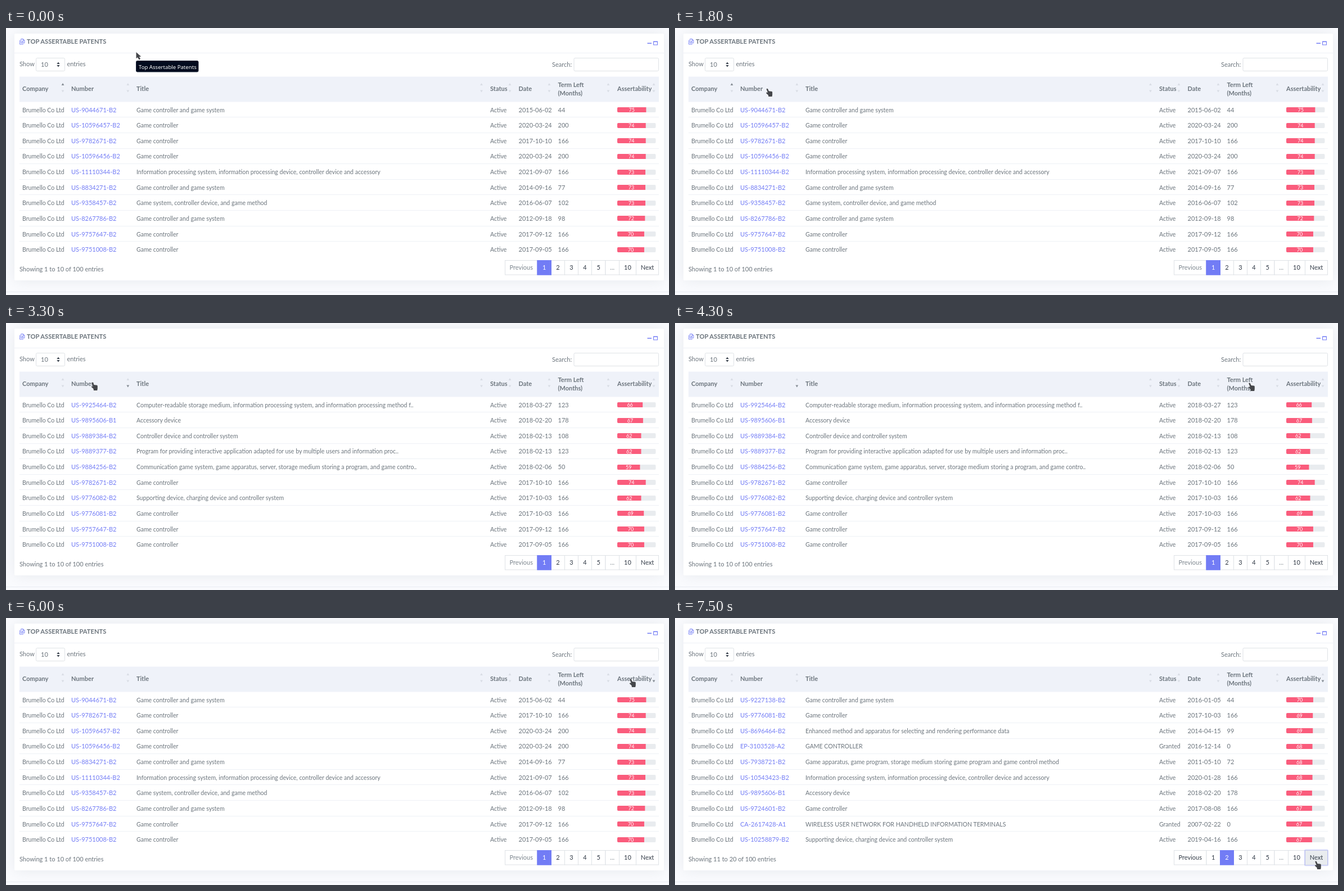
These frames come from a looping animation (1179 by 475 pixels, 8 s). An HTML page:

```html
<!DOCTYPE html>
<html lang="en">
<head>
<meta charset="utf-8">
<title>Top assertable patents</title>
<style>
html, body { margin: 0; width: 100%; height: 100%; overflow: hidden; background: #fafbfe; }
svg { display: block; width: 1179px; height: 475px; }
text { font: 11px Lato, "Open Sans", sans-serif; fill: #6c757d; white-space: pre; }
.head { font-weight: 700; }
.title { font-weight: 700; font-size: 11.15px; }
.cell { font-size: 10.55px; }
.link { fill: #727cf5; }
.val { font-size: 9px; fill: #fff; text-anchor: middle; }
.page { text-anchor: middle; fill: #313a46; }
.tip { font: 9.6px "Noto Sans", sans-serif; fill: #fff; }
</style>
</head>
<body>
<svg id="stage" viewBox="0 0 1179 475" xmlns="http://www.w3.org/2000/svg">
  <filter id="soft" x="-10%" y="-20%" width="120%" height="140%"><feGaussianBlur stdDeviation="13"/></filter>
  <rect width="1179" height="475" fill="#fafbfe"/>
  <rect x="15" y="10" width="1155" height="439" fill="#9aa1ab" opacity=".2" filter="url(#soft)"/>
  <rect x="15" y="10" width="1155" height="439" rx="2" fill="#fff"/>
  <path d="M15 44.5H1170" stroke="#eef1f7"/>
  <path d="M0 469.5H1179" stroke="#e9ecf2"/>
  <g fill="none" stroke="#727cf5">
    <path d="M26.7 19.5h3.8l2.4 2.4v4.8h-6.2zM30.3 19.6v2.6h2.5M24.6 21.6v7.4h6.4M28.2 23.5h2.8M28.2 25h2.8" stroke-width=".9"/>
    <path d="M1140.5 27.2h7.5" stroke-width="1.5"/>
    <path d="M1151.6 24h6.8v6h-6.8zM1151.6 24.4h6.8" stroke-width="1.1"/>
  </g>
  <g fill="#fff" stroke="#dee2e6">
    <rect x="53.5" y="53.5" width="51" height="23" rx="2"/>
    <rect x="1010" y="53.5" width="150.5" height="23" rx="2"/>
  </g>
  <path d="M90.3 64L93 60.8 95.7 64zM90.3 66L93 69.2 95.7 66z" fill="#313a46"/>
  <rect x="24" y="86.5" width="1137" height="45" fill="#eff2f9"/>
  <g id="chrome"></g>
  <g id="marks"></g>
  <g id="table"></g>
  <g id="pager"></g>
  <g id="tooltip">
    <rect x="231.5" y="58.5" width="110.5" height="19.5" rx="2" fill="#020b1e" stroke="#1b2437"/>
    <text class="tip" x="236" y="72.6">Top Assertable Patents</text>
  </g>
  <path id="cursor" fill="#44464a" stroke="#fff" stroke-opacity=".5" stroke-width=".8" paint-order="stroke"/>
</svg>
<script>
const LOOP = 8000, STEP = 100;
const OWNER = "Brumello Co Ltd";
const $ = id => document.getElementById(id);

// number | title | status | date | months left | score
const records = `
US-9044671-B2|Game controller and game system|Active|2015-06-02|44|75
US-10596457-B2|Game controller|Active|2020-03-24|200|74
US-9782671-B2|Game controller|Active|2017-10-10|166|74
US-10596456-B2|Game controller|Active|2020-03-24|200|74
US-11110344-B2|Information processing system, information processing device, controller device and accessory|Active|2021-09-07|166|73
US-8834271-B2|Game controller and game system|Active|2014-09-16|77|73
US-9358457-B2|Game system, controller device, and game method|Active|2016-06-07|102|73
US-8267786-B2|Game controller and game system|Active|2012-09-18|98|72
US-9757647-B2|Game controller|Active|2017-09-12|166|70
US-9751008-B2|Game controller|Active|2017-09-05|166|70
CA-2507075-A1|GAME CONSOLE AND MEMORY CARD|Granted|2006-02-20|0|58
CA-2617428-A1|WIRELESS USER NETWORK FOR HANDHELD INFORMATION TERMINALS|Granted|2007-02-22|0|67
CA-2746481-A1|GAME SYSTEM, CONTROLLER DEVICE, AND GAME PROCESS METHOD|Granted|2011-08-03|0|63
CA-2746486-A1|DISPLAY DEVICE, GAME SYSTEM, AND GAME PROCESS METHOD|Granted|2011-08-03|0|63
EP-1747806-A1|GAME APPARATUS, GAME PROGRAM, MEMORY MEDIUM WHERE GAME PROGRAM IS STORED, AND GAME CONTROL METHOD|Granted|2007-01-31|0|59
EP-1757345-A1|Video game controller and video game system|Granted|2007-02-28|0|61
EP-1935124-A2|WIRELESS USER NETWORK FOR HANDHELD INFORMATION TERMINALS|Granted|2008-06-25|0|63
EP-2292305-A1|Video game controller and video game system|Granted|2011-03-09|0|60
EP-2392391-A1|DISPLAY DEVICE, GAME SYSTEM, AND GAME PROCESSING METHOD|Granted|2011-12-07|0|58
EP-2395763-A2|Storage medium having stored therein stereoscopic image display program, stereoscopic image display ..|Pending|2011-12-14|0|61
US-9925464-B2|Computer-readable storage medium, information processing system, and information processing method f..|Active|2018-03-27|123|66
US-9895606-B1|Accessory device|Active|2018-02-20|178|67
US-9889384-B2|Controller device and controller system|Active|2018-02-13|108|62
US-9889377-B2|Program for providing interactive application adapted for use by multiple users and information proc..|Active|2018-02-13|123|62
US-9884256-B2|Communication game system, game apparatus, server, storage medium storing a program, and game contro..|Active|2018-02-06|50|59
US-9776082-B2|Supporting device, charging device and controller system|Active|2017-10-03|166|62
US-9776081-B2|Game controller|Active|2017-10-03|166|69
US-7907779-B2|Game apparatus and storage medium storing a handwriting input program|Active|2011-03-15|87|58
US-10835814-B2|Game controller|Active|2020-11-17|200|58
US-10022620-B2|Handheld information processing apparatus, storage medium and information processing method|Active|2018-07-17|126|58
EP-3572130-A1|GAME CONTROLLER|Pending|2019-11-27|0|58
US-9731205-B2|Communication game system, game apparatus, server, storage medium storing a program, and game contro..|Active|2017-08-15|49|59
US-9687733-B2|Game apparatus, storage medium, game controlling method and game system|Active|2017-06-27|108|59
US-9533225-B2|Computer-readable storage medium having information processing program stored therein, information p..|Active|2017-01-03|139|59
US-9227138-B2|Game controller and game system|Active|2016-01-05|44|70
US-8696464-B2|Enhanced method and apparatus for selecting and rendering performance data|Active|2014-04-15|99|69
EP-3103528-A2|GAME CONTROLLER|Granted|2016-12-14|0|68
US-7938721-B2|Game apparatus, game program, storage medium storing game program and game control method|Active|2011-05-10|72|68
US-10543423-B2|Information processing system, information processing device, controller device and accessory|Active|2020-01-28|166|68
US-9724601-B2|Game controller|Active|2017-08-08|166|67
US-10258879-B2|Supporting device, charging device and controller system|Active|2019-04-16|166|67
`.trim().split("\n").map(line => line.split("|"));

const pick = keys => keys.split(" ").map(k => records.find(r => r[0].includes(k)));
const byOwner = records.slice(0, 10);
const byNumber = records.slice(10, 20);
const byNumberDown = pick("9925464 9895606 9889384 9889377 9884256 9782671 9776082 9776081 9757647 9751008");
const byScore = pick("2392391 7907779 10835814 10022620 3572130 2507075 9884256 9731205 9687733 9533225");
const byScoreDown = pick("9044671 9782671 10596457 10596456 8834271 11110344 9358457 8267786 9757647 9751008");
const secondPage = pick("9227138 9776081 8696464 3103528 7938721 10543423 9895606 9724601 2617428 10258879");

// from: start time, sort: column and direction
const states = [
  { from: 0, rows: byOwner, sort: "0up", page: 1 },
  { from: 2400, rows: byNumber, sort: "1up", page: 1 },
  { from: 2900, rows: byNumber, sort: "", page: 1 },
  { from: 3300, rows: byNumberDown, sort: "1down", page: 1 },
  { from: 5200, rows: byScore, sort: "6up", page: 1 },
  { from: 6000, rows: byScoreDown, sort: "6down", page: 1 },
  { from: 7300, rows: byScoreDown, sort: "6down", page: 1, pressed: true },
  { from: 7500, rows: secondPage, sort: "6down", page: 2, pressed: true }
];

// pointer keys: time, x, y, shape used from here on
const keys = [
  [100, 231.5, 43, "arrow"], [300, 292, 74, "arrow"], [500, 395, 122, "arrow"],
  [700, 300, 171, "arrow"], [1000, 156, 154, "arrow"],
  [1300, 71, 132, "arrow"], [1600, 183, 112, "hand"], [1900, 152, 105.5, "hand"],
  [3300, 152, 105.5, "hand"], [3700, 560, 92.5, "hand"], [4100, 999, 102, "hand"],
  [4300, 1020, 106.5, "hand"], [4600, 1137, 111, "hand"], [5000, 1109, 108.5, "hand"],
  [6200, 1109, 108.5, "hand"], [6300, 1075, 140, "arrow"], [6500, 956, 300, "arrow"],
  [6800, 1150, 439, "arrow"], [6900, 1139, 436.5, "arrow"], [7000, 1139, 436.5, "arrow"],
  [7100, 1138, 432.5, "hand"]
];
const shapes = {
  arrow: "M0 0V11.2L2.6 9.2 5 13.4 7.6 12.1 5.4 8.2 8.6 7.8Z",
  hand: "M1.4 0C.4 0 .1 1 .5 1.8L2.7 7.2 1.3 6.9C-.3 6.7-.6 8.2.4 8.8L3.4 11.6 4 14.4H10.2L10.8 11.2V6.8C10.8 5.4 9.4 5.2 8.3 5.1L4.5 4.6 2.9.8C2.6.2 2 0 1.4 0Z"
};

const text = (x, y, s, cls = "") => `<text x="${x}" y="${y}" class="${cls}">${s}</text>`;
const rect = (x, y, w, h, attrs) => `<rect x="${x}" y="${y}" width="${w}" height="${h}" ${attrs}/>`;

const columns = [
  ["Company", 29, 101], ["Number", 116, 216.8], ["Title", 232, 845.5], ["Status", 861, 896],
  ["Date", 911.5, 966], ["Term Left", 981.5, 1071], ["Assertability", 1087, 1152]
];
const pages = [
  ["Previous", 887.5, 945], ["1", 945, 969.5], ["2", 969.5, 993.5], ["3", 993.5, 1017.5], ["4", 1017.5, 1041.5],
  ["5", 1041.5, 1066], ["...", 1066, 1090.5], ["10", 1090.5, 1120.5], ["Next", 1120.5, 1160.5]
];

function drawChrome() {
  $("chrome").innerHTML = text(37, 28.3, "TOP ASSERTABLE PATENTS", "title") +
    text(24, 68, "Show") + text(62, 69, "10") + text(108.5, 68, "entries") + text(971, 69, "Search:") +
    columns.map(([name, x]) => text(x, name === "Term Left" ? 105 : 112.3, name, "head")).join("") +
    text(981.5, 120, "(Months)", "head");
}

function drawMarks(sort) {
  const tri = (x, y, dy, on) =>
    `<path d="M${x - 2.4} ${y}h4.8l-2.4 ${dy}z" fill="${on ? "#858c94" : "#d9dde5"}"/>`;
  $("marks").innerHTML = columns.map(([, , x], i) =>
    tri(x, 102, -4, sort === i + "up") + tri(x, 110.5, 4, sort === i + "down")).join("");
}

function drawRow([number, title, status, date, months, score], i) {
  const top = 131.7 + i * 27.63, base = top + 17.8;
  const bar = Math.round(top + 9.3), fill = 68.5 * score / 100;
  return (i ? `<path d="M24 ${Math.round(top) - .5}H1161" stroke="#eef1f6"/>` : "") +
    text(29, base, OWNER, "cell") + text(116, base, number, "link") + text(232, base, title, "cell") +
    text(861, base, status, "cell") + text(911.5, base, date) + text(981.5, base, months) +
    rect(1087, bar, 68.5, 9, 'rx="2" fill="#e9ecef"') +
    `<path d="M${1087 + fill} ${bar}v9H1089q-2 0-2-2v-5q0-2 2-2z" fill="#fa5c7c"/>` +
    text(1087 + fill / 2, bar + 7.8, score, "val");
}

function drawPager({ page, pressed }) {
  const box = ([name, a, b]) => {
    const on = name === String(page), hot = name === "Next" && pressed;
    const color = on ? "#727cf5" : hot ? "#e9ecef" : "#fff";
    const line = on ? "#727cf5" : "#dee2e6";
    const dim = name === "..." || name === "Previous" && page === 1;
    const ring = hot ? rect(a - .5, 412.8, b - a + 1, 27.4, 'rx="1.5" fill="none" stroke="#727cf5" stroke-opacity=".3" stroke-width="2"') : "";
    return rect(a, 413.5, b - a, 25.5, `fill="${color}" stroke="${line}"`) + ring +
      `<text class="page" x="${(a + b) / 2}" y="430.3" style="fill:${on ? "#fff" : dim ? "#7d868e" : "#313a46"}">${name}</text>`;
  };
  // the active box overlaps its neighbours
  const first = page * 10 - 9;
  $("pager").innerHTML = pages.map(box).join("") + box(pages[page]) +
    text(24, 432.5, `Showing ${first} to ${first + 9} of 100 entries`);
}

function pointerAt(t) {
  const next = keys.findIndex(k => k[0] > t);
  if (next === 0) return keys[0];
  if (next < 0) return keys[keys.length - 1];
  const a = keys[next - 1], b = keys[next];
  const p = (t - a[0]) / (b[0] - a[0]);
  return [t, a[1] + (b[1] - a[1]) * p, a[2] + (b[2] - a[2]) * p, a[3]];
}

let shown;
function render(t) {
  const state = states.filter(s => s.from <= t).pop();
  if (state !== shown) {
    shown = state;
    drawMarks(state.sort);
    $("table").innerHTML = state.rows.map(drawRow).join("");
    drawPager(state);
  }
  $("tooltip").style.display = t < 200 ? "" : "none";
  const [, x, y, shape] = pointerAt(Math.floor(t / STEP) * STEP);
  $("cursor").setAttribute("d", shapes[shape]);
  $("cursor").setAttribute("transform", `translate(${x} ${y})`);
}

drawChrome();
const start = performance.now();
function tick() {
  render((performance.now() - start) % LOOP);
  requestAnimationFrame(tick);
}
render(0);
tick();
</script>
</body>
</html>
```
